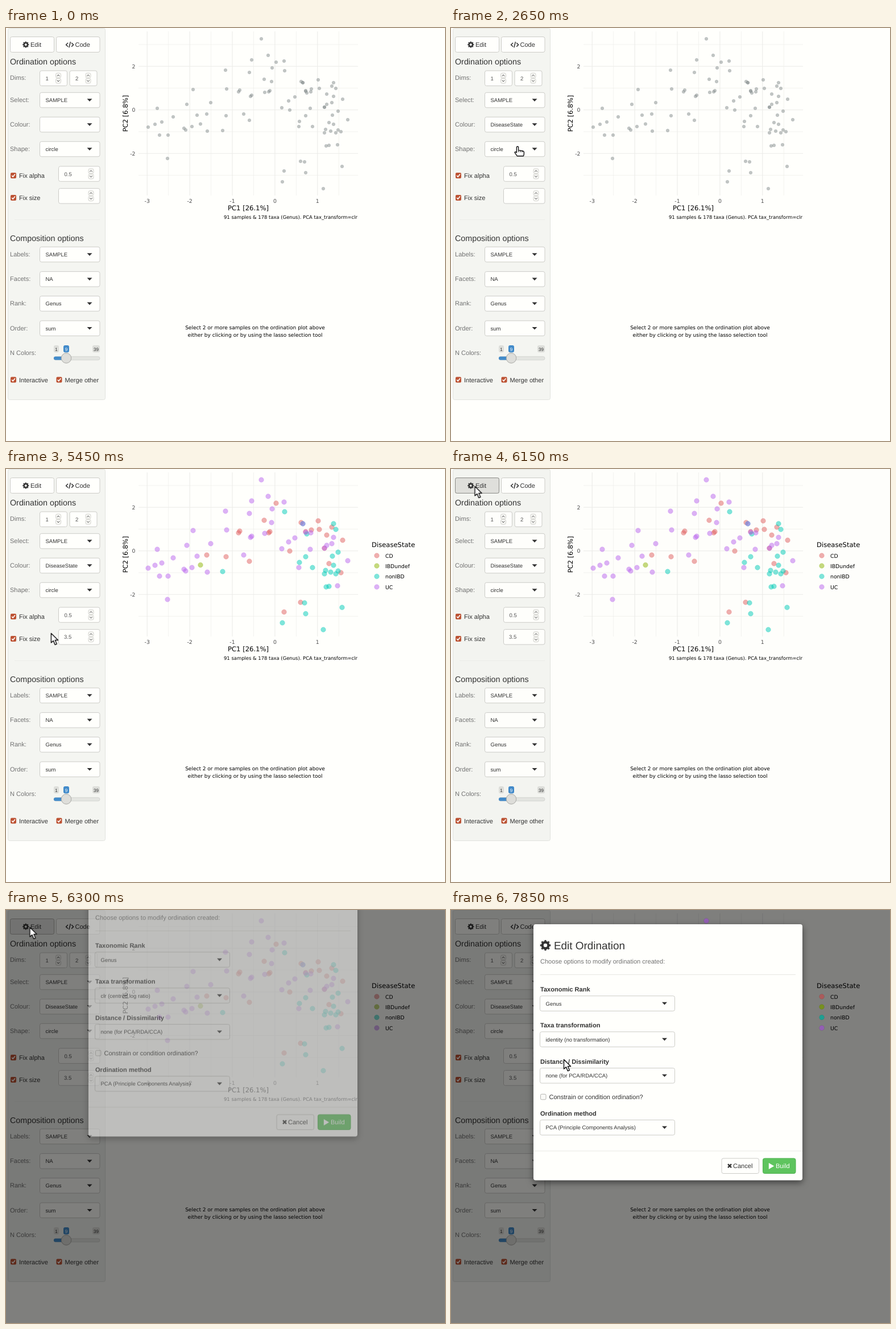
Write an HTML page that moves like this. It is 772 px wide and 725 px high and loops after 8000 ms.

```html
<!DOCTYPE html>
<html lang="en">
<head>
<meta charset="utf-8">
<title>Ordination explorer</title>
<style>
html, body { margin: 0; width: 100%; height: 100%; overflow: hidden; background: #fffffc; }
svg { display: block; width: 772px; height: 725px; }
text { font: 11.05px "Liberation Sans", Arial, sans-serif; fill: #333; text-rendering: geometricPrecision; white-space: pre; }
.h4 { font-size: 14.3px; }
.h3 { font-size: 18.9px; }
.b { font-weight: bold; }
.mute { fill: #737373; }
.val { font-size: 9.5px; }
.num { font-size: 9.5px; fill: #555; }
.chip { font-size: 8px; text-anchor: middle; }
.white { fill: #fff; }
.plot text { font: 9.3px "DejaVu Sans", sans-serif; fill: #4d4d4d; }
.plot .title { font-size: 11.6px; fill: #000; }
.plot .cap { font-size: 8.43px; fill: #000; }
.plot .msg { font-size: 9px; fill: #000; }
.plot .key { fill: #000; }
.mid { text-anchor: middle; }
.end { text-anchor: end; }
.box { fill: #fffffc; stroke: #ccccc8; }
.focus { fill: #fffffc; stroke: #66afe9; filter: drop-shadow(0 0 3px rgba(102,175,233,.6)); }
.menu { fill: #fffffc; stroke: #ccccc8; filter: drop-shadow(0 4px 4px rgba(0,0,0,.2)); }
.dots circle { fill-opacity: .5; stroke-opacity: .35; stroke-width: .7; animation: dot 8s infinite step-end; }
.lit circle { fill: currentColor; fill-opacity: .5; }
#shade { opacity: 0; animation: shade 8s infinite linear; }
#modal { animation: modal 8s infinite; }
#sheet { fill: #fffffc; filter: drop-shadow(0 4px 6px rgba(0,0,0,.5)); }
#mouse { animation: mouse 8s infinite; }
#mouse path { stroke-linejoin: round; stroke-linecap: round; }

@keyframes dot {
  0% { r: 2.75px; fill: #838b8b; stroke: #838b8b; }
  34.375% { r: 2.75px; fill: currentColor; stroke: currentColor; }
  52.5% { r: 3.3px; fill: currentColor; stroke: currentColor; }
  54.375% { r: 3.8px; fill: currentColor; stroke: currentColor; }
  61.875%, 100% { r: 4.3px; fill: currentColor; stroke: currentColor; }
}
@keyframes shade { 0%, 76.875% { opacity: 0; } 78.75%, 100% { opacity: .5; } }
@keyframes modal {
  0%, 78.125% { opacity: 0; transform: translateY(-112px); animation-timing-function: ease-out; }
  80% { opacity: 1; }
  81.25%, 100% { opacity: 1; transform: none; }
}
@keyframes mouse {
  0%, .625% { transform: translate(32px, 79px); animation-timing-function: ease-in-out; }
  11.25%, 29.5% { transform: translate(110px, 177px); animation-timing-function: ease-in-out; }
  33.125%, 35.625% { transform: translate(117px, 208px); animation-timing-function: ease-in-out; }
  39.375%, 41.875% { transform: translate(38px, 190px); animation-timing-function: ease-in-out; }
  49.375%, 63.75% { transform: translate(149px, 290px); animation-timing-function: ease-in; }
  68.125% { transform: translate(79px, 289px); animation-timing-function: ease-out; }
  73.125%, 86.25% { transform: translate(41.5px, 30px); animation-timing-function: ease-in-out; }
  92.5%, 95% { transform: translate(202px, 228px); animation-timing-function: ease-in-out; }
  97.5%, 100% { transform: translate(198px, 262px); }
}
</style>
</head>
<body>
<svg id="stage" viewBox="0 0 772 725"></svg>
<script>
const LOOP = 8000;

const text = (x, y, s, cls = '') => `<text x="${x}" y="${y}" class="${cls}">${s}</text>`;
const rect = (x, y, w, h, attrs = 'class="box"', r = 3) =>
  `<rect x="${x}" y="${y}" width="${w}" height="${h}" rx="${r}" ${attrs}/>`;
const path = (d, stroke, w = 1, fill = 'none') =>
  `<path d="${d}" fill="${fill}" stroke="${stroke}" stroke-width="${w}"/>`;
// Shows its content only in the given spans of ms, e.g. "0-400,900-1200".
const during = (spans, body) => `<g data-at="${spans}">${body}</g>`;

const arrowDown = (x, y) => path(`M${x - 4.5} ${y - 2.2}h9l-4.5 4.6z`, 'none', 0, '#333');
const arrowUp = (x, y) => path(`M${x - 4.5} ${y + 2}h9l-4.5 -4.6z`, 'none', 0, '#333');
const caret = (x, y) => path(`M${x} ${y - 6}v12`, '#333');

function select(x, y, w, value = '') {
  return rect(x, y - 13.2, w, 26.5) + arrowDown(x + w - 18, y) + text(x + 10, y + 3.5, value, 'val');
}
const focused = (x, y, w) =>
  rect(x, y - 13.2, w, 26.5, 'class="focus"') + arrowUp(x + w - 18, y);

function spinner(x, y, w, value = '') {
  const cx = x + w - 15.5;
  const step = (cy, s) => rect(cx - 4.5, cy - 4.3, 9, 8.6, 'fill="#f7f7f4" stroke="#c9c9c5" stroke-width=".8"', 2.5) +
    path(`M${cx - 2.3} ${cy + s}l2.3 ${-2 * s}l2.3 ${2 * s}`, '#444');
  return rect(x, y - 13.2, w, 26.5) + step(y - 4.8, 1.1) + step(y + 4.6, -1.1) + text(x + 10, y + 3.5, value, 'num');
}

const check = (x, y, label) =>
  rect(x - 5, y - 5, 10, 10, 'fill="#bd5334"', 2) +
  path(`M${x - 2.8} ${y}l2 2.2l3.8 -4.6`, '#fff', 1.6) + text(x + 10, y + 4, label);

const gear = (x, y, r) => `<g fill="none" stroke="#333">
  <circle cx="${x}" cy="${y}" r="${r * .58}" stroke-width="${r * .46}"/>
  <circle cx="${x}" cy="${y}" r="${r * .87}" stroke-width="${r * .28}" pathLength="16" stroke-dasharray="1 1" stroke-dashoffset=".5"/></g>`;

function menu(x, y, w, items, hot = 0) {
  const rowH = 20.6, h = Math.min(items.length, 8) * rowH + 6;
  return rect(x, y, w, h, 'class="menu"') + items.map((s, i) =>
    (i === hot ? rect(x + .5, y + 3 + i * rowH, w - 1, rowH, 'fill="#f3f3ef"', 0) : '') +
    text(x + 9.5, y + 17.3 + i * rowH, s)).join('');
}

function sidebar() {
  const row = (y, label, value) => text(7, y + 4, label, 'mute') + select(59.5, y + .5, 105.5, value);
  const chip = (x, w, s, bg, cls) => rect(x, 557, w, 12.5, `fill="${bg}"`) + text(x + w / 2, 566.5, s, 'val chip ' + cls);
  const typed = (s, spans) => during(spans, text(69.5, 173, s, 'val'));
  const size = (s, spans) => during(spans, text(102, 298, s, 'num'));
  return rect(3.5, .5, 171, 652, 'fill="#f4f5f1" stroke="#e2e3df"') +
    rect(7.5, 15.5, 77, 27) + rect(88.5, 15.5, 76.5, 27) +
    during('5800-6950', rect(7.5, 15.5, 77, 27, 'fill="#e6e6e3" stroke="#adada9"')) +
    during('6100-6300', rect(7.5, 15.5, 77, 27, 'fill="#e0e0dc" stroke="#8c8c88"')) +
    gear(34.8, 29.2, 5.6) + text(43, 33, 'Edit') +
    path('M109 26l-3.4 3.4l3.4 3.4M115.2 26l3.4 3.4l-3.4 3.4M113.4 24.2l-2.6 10.2', '#333', 1.5) + text(121.5, 33, 'Code') +
    text(7, 63.5, 'Ordination options', 'h4') +
    text(7, 91, 'Dims:', 'mute') + spinner(59.5, 88.2, 48, 1) + spinner(112, 88.2, 48, 2) +
    row(126, 'Select:', 'SAMPLE') + row(169, 'Colour:', '') + row(212, 'Shape:', 'circle') +
    check(13, 259, 'Fix alpha') + spinner(92.5, 256, 72.5, '0.5') +
    check(13, 298, 'Fix size') + spinner(92.5, 294.8, 72.5) +
    size('2', '0-4100') + size('2.5', '4100-4150') + size('3', '4150-4800') + size('3.5', '4800-8000') +
    path('M15 336.5h150', '#ecede9') +
    text(7, 374, 'Composition options', 'h4') +
    row(397, 'Labels:', 'SAMPLE') + row(440.3, 'Facets:', 'NA') +
    row(483.3, 'Rank:', 'Genus') + row(526.6, 'Order:', 'sum') +
    text(7, 574, 'N Colors:', 'mute') +
    chip(84, 9, '1', '#dddeda', '') + chip(101, 10, '9', '#428bca', 'white') + chip(152, 13, '39', '#dddeda', '') +
    rect(84, 576.8, 81, 6, 'fill="#e4e5e1" stroke="#cfd0cc" stroke-width=".8"') + rect(84, 576.8, 22, 6, 'fill="#428bca"') +
    '<circle cx="106" cy="579.5" r="8.8" fill="#dededa" stroke="#a9a9a5"/>' +
    check(13, 617.5, 'Interactive') + check(93.5, 617.5, 'Merge other') +
    during('1000-2400', focused(59.5, 169.5, 105.5)) +
    typed('azure4', '0-1400') + typed('d', '1600-1750') + typed('di', '1750-1850') +
    typed('dis', '1850-2400') + typed('DiseaseState', '2400-8000') +
    during('1000-1400', caret(99.5, 169.5)) + during('1400-1600', caret(70, 169.5)) +
    during('1600-1750', caret(75.5, 169.5)) + during('1750-1850', caret(77.5, 169.5)) +
    during('1850-2200', caret(81.7, 169.5));
}

function colourMenu() {
  const colours = ['aquamarine', 'aquamarine2', 'aquamarine3', 'aquamarine4', 'azure', 'azure2', 'azure3', 'azure4', 'beige'];
  const found = (spans, items) => during(spans, menu(59.5, 184.5, 105.5, items));
  return during('1000-1600', rect(59.5, 184.5, 105.5, 160, 'class="menu"') +
      '<clipPath id="list"><rect x="60" y="184" width="105" height="161"/></clipPath><g clip-path="url(#list)">' +
      rect(60, 316.3, 95, 20.4, 'fill="#f3f3ef"', 0) +
      colours.map((s, i) => text(69, 186.2 + i * 20.6, s)).join('') + '</g>' +
      rect(160.5, 193, 4.5, 13, 'fill="#e28168"', 1)) +
    found('1600-1750', ['DiseaseState', 'darkblue', 'darkcyan', 'darkgray', 'darkgreen', 'darkkhaki', 'darkorange', 'darkred']) +
    found('1750-1850', ['DiseaseState', 'indianred', 'indianred1', 'indianred2', 'indianred3', 'indianred4']) +
    found('1850-2400', ['DiseaseState']);
}

const hue = { CD: '#e0605f', IBDundef: '#8bb400', nonIBD: '#00cbb8', UC: '#ba66ee' };
const legendY = { CD: 152, IBDundef: 170, nonIBD: 188.5, UC: 207 };

function dots(group, xy) {
  let out = '';
  for (let i = 0; i < xy.length; i += 2) out += `<circle cx="${xy[i]}" cy="${xy[i + 1]}" r="4.3"/>`;
  return `<g color="${hue[group]}">${out}</g>`;
}
const keys = () => Object.keys(hue).map(k => dots(k, [652, legendY[k]])).join('');

function plot() {
  let out = '';
  for (let i = 0; i < 10; i++) {
    const x = 248.2 + i * 37.45;
    out += path(`M${x} 6V294`, '#ebebe8', i % 2 ? .6 : 1.1);
    if (i % 2 === 0) out += text(x, 306.8, i / 2 - 3, 'mid');
  }
  for (let i = 0; i < 7; i++) {
    const y = 29 + i * 38.25;
    out += path(`M233 ${y}H619`, '#ebebe8', i % 2 ? 1.1 : .6);
    if (i % 2) out += text(227.5, y + 3.6, 3 - i, 'end');
  }
  out += text(426, 320, 'PC1 [26.1%]', 'title mid') +
    `<g transform="translate(213.5 150) rotate(-90)">${text(0, 0, 'PC2 [6.8%]', 'title mid')}</g>` +
    text(383, 334.5, '91 samples &amp; 178 taxa (Genus). PCA tax_transform=clr', 'cap') +
    text(438, 529, 'Select 2 or more samples on the ordination plot above', 'msg mid') +
    text(438, 541.5, 'either by clicking or by using the lasso selection tool', 'msg mid');
  out += '<g class="dots">' +
    dots('CD', [475,60, 454,90, 411,109, 409,112, 464,110, 462,112, 549,91, 551,106, 537,107, 519,94, 573,102, 564,116,
      592,125, 499,144, 353,151, 387,154, 428,162, 560,139, 568,166, 589,182, 518,234, 489,251, 527,110]) +
    dots('IBDundef', [342,168.5]) +
    dots('nonIBD', [490,75, 576,96, 580,106, 522,96, 529,114, 584,146, 574,153, 527,154, 516,164, 539,173, 576,169, 562,178,
      571,181, 560,184, 580,184, 584,179, 563,207, 568,206, 525,235, 527,254, 591,243, 486,270, 558,282, 381,180]) +
    dots('UC', [449,19, 461,48, 432,56, 489,58, 386,74, 468,70, 428,78, 467,94, 388,107, 329,108, 455,113, 432,118, 430,120,
      508,121, 497,128, 360,131, 318,134, 266,141, 485,140, 535,141, 576,120, 573,131, 564,134, 560,139, 536,112, 527,111,
      418,151, 294,156, 336,153, 274,165, 262,169, 250,174, 327,173, 313,176, 316,179, 354,181, 270,188, 285,188, 284,229,
      515,173, 601,161, 583,205, 522,96]) + '</g>';
  out += during('2750-8000', text(643, 136.5, 'DiseaseState', 'title') + `<g class="dots">${keys()}</g>` +
    Object.keys(hue).map(k => text(667, legendY[k] + 3.5, k, 'key')).join(''));
  return `<g class="plot">${out}</g>`;
}

function modal() {
  const field = (y, label, value) => text(157, y - 21, label, 'b') + select(156.5, y, 237, value);
  return '<g id="modal">' + rect(145, 25, 473, 449.5, 'id="sheet"', 4) +
    gear(166, 62, 9.2) + text(181, 69, 'Edit Ordination', 'h3') +
    text(157, 93.5, 'Choose options to modify ordination created:', 'mute') +
    path('M157 113.5h449M145 423h473', '#e7e7e3') +
    field(164, 'Taxonomic Rank', 'Genus') +
    field(227, 'Taxa transformation') +
    field(290.7, 'Distance / Dissimilarity', 'none (for PCA/RDA/CCA)') +
    rect(157.5, 323.3, 9.5, 9.5, 'fill="#fafaf7" stroke="#b5b5b1"', 2) + text(172.5, 332, 'Constrain or condition ordination?') +
    field(381.8, 'Ordination method', 'PCA (Principle Components Analysis)') +
    rect(476, 436, 65.5, 26.5) + path('M487 446.2l6 6m0 -6l-6 6', '#333', 2.4) + text(496, 453, 'Cancel') +
    rect(548.5, 436, 57.5, 26.5, 'fill="#5ec45e" stroke="#4fb24f"') +
    path('M558.8 444v11l9.4 -5.5z', 'none', 0, '#fff') + text(571, 453, 'Build', 'white') +
    during('7450-7800', focused(156.5, 227, 237)) +
    during('0-7800', text(166.5, 230.5, 'clr (centred log ratio)', 'val')) +
    during('7800-8000', text(166.5, 230.5, 'identity (no transformation)', 'val')) +
    during('7500-7800', menu(156.5, 242, 237, ['identity (no transformation)', 'clr (centred log ratio)',
      'compositional', 'binary (presence/absence)', 'log10']) ) + '</g>';
}

function mouse() {
  const beam = 'M-5 -7.5q4 0 5 1.5q1 -1.5 5 -1.5M-5 7.5q4 0 5 -1.5q1 1.5 5 1.5M0 -6v12M-2.5 2.5h5';
  return '<g id="mouse">' +
    during('0-420,550-640,3060-3480,3640-7300,7780-8000',
      path('M.5 .5V17l3.9 -3.4l3 7l3 -1.3l-3 -6.8h5.2z', '#111', 1.4, '#fff')) +
    during('420-550,640-950,2400-3060,3480-3640,7300-7450,7600-7780',
      path('M-1.6 1.6q0 -1.6 1.6 -1.6t1.6 1.6V6.6l7.2 1.2q2.6 .6 2.6 2.8v2q0 2 -1 4.2h-11l-4 -5.6q-.8 -2 1.2 -1.8l1.8 1.4z', '#111', 1.4, '#fff') +
      path('M1.6 6.6v3M4.8 7.4v2.4M8 8v2', '#111')) +
    during('950-2400,7450-7600', path(beam, '#fff', 3.4) + path(beam, '#111', 1.5)) + '</g>';
}

document.getElementById('stage').innerHTML = plot() + sidebar() + colourMenu() +
  '<rect id="shade" width="772" height="725"/>' +
  during('6350-8000', `<g class="lit">${keys()}${dots('UC', [449, 19])}</g>`) +
  modal() + mouse();

for (const el of document.querySelectorAll('[data-at]')) {
  const frames = [{ opacity: 0, offset: 0 }];
  for (const span of el.dataset.at.split(',')) {
    const [on, off] = span.split('-').map(t => t / LOOP);
    frames.push({ opacity: 1, offset: on }, { opacity: 0, offset: off });
  }
  frames.push({ opacity: 0, offset: 1 });
  el.animate(frames.map(f => ({ ...f, easing: 'step-end' })), { duration: LOOP, iterations: Infinity });
}
</script>
</body>
</html>
```
